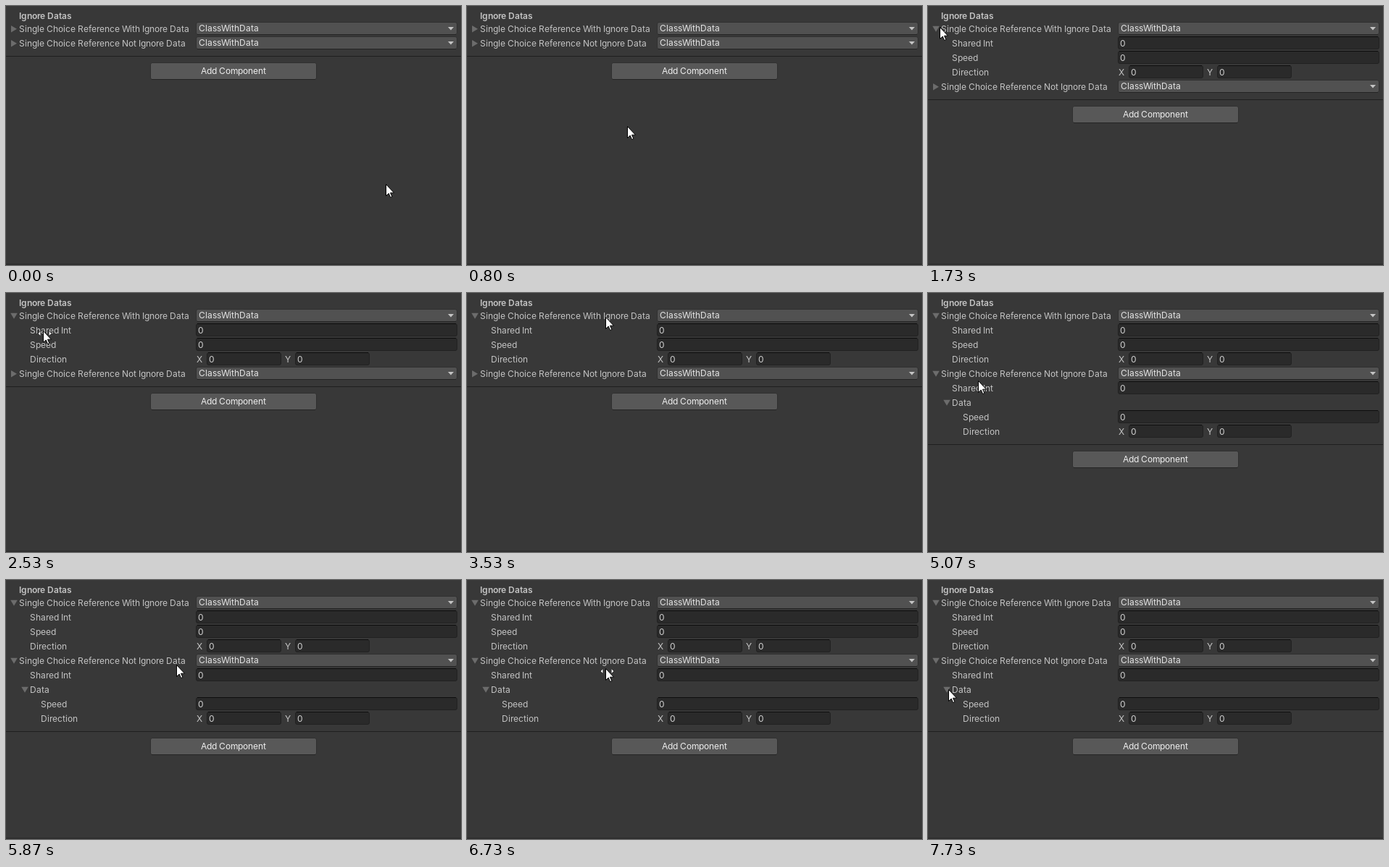
Recreate the animation shown at these times as an HTML page with a canvas. Size 628 by 358 pixels, loop 8000 ms.

```html
<!DOCTYPE html>
<html lang="en">
<head>
<meta charset="utf-8">
<title>Inspector foldouts</title>
<style>
html, body { margin: 0; height: 100%; overflow: hidden; background: #383838; }
canvas { display: block; }
</style>
</head>
<body>
<canvas id="stage" width="628" height="358"></canvas>
<script>
const ctx = document.getElementById('stage').getContext('2d');
const RATE = 15, TICKS = 120;   // the screen advances 15 times per second
const ROW = 20, LABEL = '#c4c4c4';
const press = { first: 26, second: 76, closeData: 110, openData: 116 };

// Stops of the pointer: tick, x, y
const stops = [
  [0, 525, 247], [12, 222, 167], [23, 13, 28], [press.first, 17, 30],
  [38, 52, 53], [46, 219, 38], [53, 192, 34], [59, 233, 39],
  [72, 12, 108], [press.second, 70, 122], [88, 236, 118], [95, 175, 116],
  [101, 192, 123], [107, 54, 166], [press.closeData, 29, 152]
];

// Straight travel between stops; the pointer rests until a press registers.
function pointerAt(tick) {
  const next = stops.findIndex(s => s[0] > tick);
  if (next < 0) return stops.at(-1).slice(1);
  const [t0, x0, y0] = stops[next - 1], [t1, x1, y1] = stops[next];
  const k = Object.values(press).includes(t1) ? 0 : (tick - t0) / (t1 - t0);
  return [Math.round(x0 + (x1 - x0) * k), Math.round(y0 + (y1 - y0) * k)];
}

// Editor text advances by whole pixels and rounds on the tight side for r, m and W.
function advance(ch) {
  return Math.round(ctx.measureText(ch).width - ('rmW'.includes(ch) ? .35 : 0));
}

function text(str, x, y, color = LABEL, weight = 400) {
  ctx.font = `${weight} 12px Inter, "Open Sans", sans-serif`;
  ctx.fillStyle = color;
  for (const ch of str) {
    ctx.fillText(ch, x, y);
    x += advance(ch);
  }
}

function box(x, y, w, h, fill, border, edge, edgeY) {
  ctx.beginPath();
  ctx.roundRect(x + .5, y + .5, w - 1, h - 1, 2.5);
  ctx.fillStyle = fill;
  ctx.fill();
  ctx.lineWidth = 1;
  ctx.strokeStyle = border;
  ctx.stroke();
  ctx.fillStyle = edge;
  ctx.fillRect(x + 2, edgeY, w - 4, 1);
}

const raised = (x, y, w, h, fill) => box(x, y, w, h, fill, '#303030', '#242424', y + h - 1);

function field(x, y, w) {
  box(x, y, w, 18, '#2a2a2a', '#212121', '#0d0d0d', y);
  text('0', x + 3, y + 14, '#d2d2d2');
}

// Triangle around a centre, pointing down or turned to the right
function triangle(x, y, half, height, color, right) {
  ctx.save();
  ctx.translate(x, y);
  if (right) ctx.rotate(-Math.PI / 2);
  ctx.fillStyle = color;
  ctx.beginPath();
  ctx.moveTo(-half, -height / 2);
  ctx.lineTo(half, -height / 2);
  ctx.lineTo(0, height / 2);
  ctx.fill();
  ctx.restore();
}

const controls = {
  drop(y) {
    raised(262, y, 361, 18, '#515151');
    text('ClassWithData', 266, y + 13, '#e4e4e4');
    triangle(614, y + 9.2, 4, 4.5, LABEL);
  },
  number(y) { field(262, y, 361); },
  vector(y) {
    ['X', 'Y'].forEach((axis, i) => {
      const x = 263 + 122 * i;
      text(axis, x, y + 14);
      field(x + 14, y, 103);
    });
  },
  none() {}
};

const row = (label, x, control, open) => ({ label, x, control, open });
const values = x => [row('Speed', x, 'number'), row('Direction', x, 'vector')];

function rowsAt(tick) {
  const first = tick >= press.first, second = tick >= press.second;
  const data = tick < press.closeData || tick >= press.openData;
  const shared = row('Shared Int', 33, 'number');
  return [
    row('Single Choice Reference With Ignore Data', 18, 'drop', first),
    ...(first ? [shared, ...values(33)] : []),
    row('Single Choice Reference Not Ignore Data', 18, 'drop', second),
    ...(second ? [shared, row('Data', 33, 'none', data), ...(data ? values(48) : [])] : [])
  ];
}

const arrow = new Path2D('M.5 .5V16.5L4.2 13L6.6 18.5L8.9 17.5L6.5 12.2H11.5Z');
const slideArrows = new Path2D('M-6.5 4L-3.5 1V7ZM11.5 4L8.5 1V7Z');

function pointer(x, y, sliding) {
  ctx.save();
  ctx.translate(x - 1, y - 1);
  ctx.fillStyle = '#fff';
  ctx.strokeStyle = '#000';
  if (sliding) {
    ctx.stroke(slideArrows);
    ctx.fill(slideArrows);
  }
  ctx.fill(arrow);
  ctx.stroke(arrow);
  ctx.restore();
}

function draw(tick) {
  ctx.fillStyle = '#383838';
  ctx.fillRect(0, 0, 628, 358);
  text('Ignore Datas', 18, 18, LABEL, 600);

  const [px, py] = pointerAt(tick);
  let y = 22, sliding = false;
  for (const r of rowsAt(tick)) {
    if (r.open !== undefined) triangle(r.x - 7, y + 9.7, 4.8, 8, '#6c6c6c', !r.open);
    text(r.label, r.x, y + 14);
    controls[r.control](y);
    sliding ||= r.control === 'number' && px >= r.x && px < 260 && py > y && py < y + 18;
    y += ROW;
  }

  ctx.fillStyle = '#1f1f1f';
  ctx.fillRect(0, y + 7, 628, 1);
  raised(199, y + 16, 230, 24, '#585858');
  text('Add Component', 269, y + 32, '#eeeeee');
  ctx.fillStyle = '#2e2e2e';
  ctx.fillRect(0, 356, 628, 2);
  pointer(px, py, sliding);
}

const start = performance.now();
function loop() {
  const time = performance.now() - start;
  draw(Math.floor((time + 4) * RATE / 1000) % TICKS);
  requestAnimationFrame(loop);
}
loop();
</script>
</body>
</html>
```
